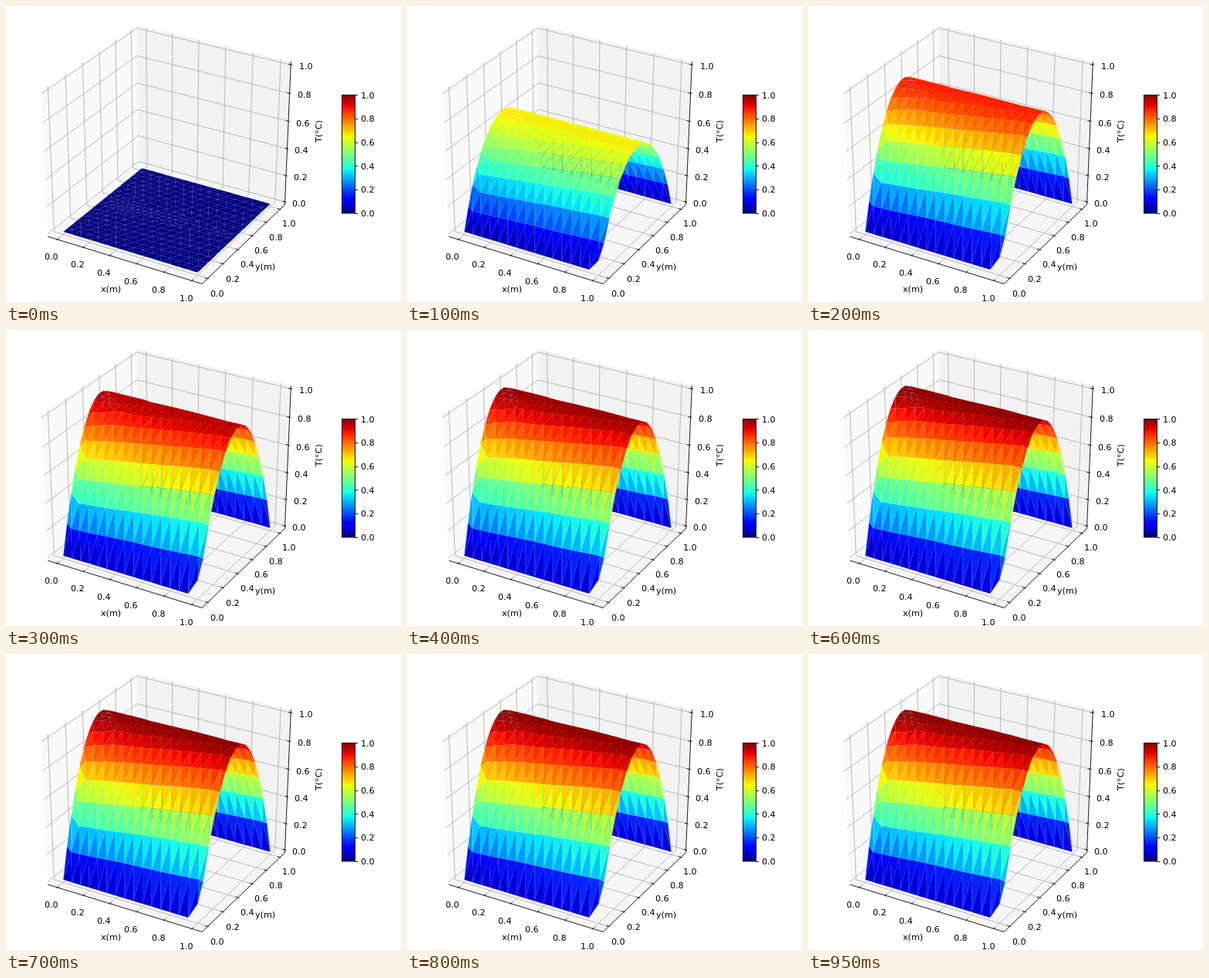
Write an HTML page with a canvas that moves like this. It is 512 by 384 pixels and loops after 1000 ms.

```html
<!DOCTYPE html>
<html>
<head>
<meta charset="utf-8">
<style>
  html, body { margin: 0; width: 100%; height: 100%; overflow: hidden; background: #fff; }
  canvas { display: block; }
</style>
</head>
<body>
<canvas id="stage" width="512" height="384"></canvas>
<script>
const ctx = document.getElementById('stage').getContext('2d');
const E = 0.5 + 1 / 48;            // half size of the axes box
const TICKS = [0, 0.2, 0.4, 0.6, 0.8, 1];
const GRID = '#b0b0b0';
const { abs, sin, exp, PI, hypot, round, floor } = Math;

// Perspective view from elevation 30, azimuth -60, distance 10
const depth = ([x, y, z]) => 0.433 * x - 0.75 * y + 0.5 * z;
function project(p) {
  const [x, y, z] = p, d = 10 - depth(p);
  const u = (0.866 * x + 0.5 * y) / d;
  const v = (-0.25 * x + 0.433 * y + 0.866 * z) / d;
  return [(u + 0.095) * 409.6 / 0.185, 384 - (v + 0.095) * 384 / 0.185];
}
const flat = v => (v - 0.5) / 1.1; // x or y value to box units

function path(points) {
  ctx.beginPath();
  for (const p of points) ctx.lineTo(...project(p));
}
function fill(points, color) {
  path(points);
  ctx.fillStyle = color;
  ctx.fill();
}
function line(points, color = '#000') {
  path(points);
  ctx.strokeStyle = color;
  ctx.stroke();
}

// Piecewise linear colour map
function ramp(v, stops) {
  for (let i = 1; i < stops.length; i++) {
    const [a, p] = stops[i - 1], [b, q] = stops[i];
    if (v <= b) return round(255 * (p + (q - p) * (v - a) / (b - a)));
  }
  return round(255 * stops[stops.length - 1][1]);
}
const RED = [[0, 0], [0.35, 0], [0.66, 1], [0.89, 1], [1, 0.5]];
const GREEN = [[0, 0], [0.125, 0], [0.375, 1], [0.64, 1], [0.91, 0], [1, 0]];
const BLUE = [[0, 0.5], [0.11, 1], [0.34, 1], [0.65, 0], [1, 0]];
const jet = v => `rgb(${ramp(v, RED)},${ramp(v, GREEN)},${ramp(v, BLUE)})`;

// Mesh nodes: staggered rows from both cold edges that close up to the left,
// a fine filling in the wedge between them, and the border
function makeNodes() {
  const nodes = [], N = 15, LEFT = 17, ROWS = 7;
  const step = x => 0.05 + 0.018 * x;
  const jitter = () => 0.001 * sin(97 * nodes.length);
  const add = (x, y) => {
    const dx = 0.19 - x, dy = 0.46 - y;
    const pull = 0.35 * exp(-(dx * dx + dy * dy) / 0.01);
    nodes.push([x + dx * pull + jitter(), y + dy * pull + jitter() / 2]);
  };
  for (let j = 1; j <= ROWS; j++)
    for (let i = j % 2 ? 0.5 : 1; i < N; i++) {
      const x = i / N, y = j * step(x);
      add(x, y);
      add(x, 1 - y);
    }
  for (let j = -3; j <= 3; j++)
    for (let x = j % 2 ? 0.035 : 0.058; x < 0.97; x += 0.045) {
      const y = 0.04 * j;
      if (abs(y) + 0.03 < 0.5 - ROWS * step(x)) add(x, 0.5 + y);
    }
  for (let i = 0; i <= N; i++) {
    const t = i / N + (i % N ? jitter() / 4 : 0);
    nodes.push([t, 0], [t, 1]);
    if (i % N) nodes.push([1, t]);
  }
  for (let i = 1; i < LEFT; i++) nodes.push([0, i / LEFT + jitter() / 4]);
  return nodes;
}

// Delaunay triangulation by incremental insertion
function triangulate(nodes) {
  const n = nodes.length;
  const p = [...nodes, [-90, -90], [90, -90], [0, 120]];
  const make = (a, b, c) => {
    const [ax, ay] = p[a];
    const bx = p[b][0] - ax, by = p[b][1] - ay, cx = p[c][0] - ax, cy = p[c][1] - ay;
    const det = 2 * (bx * cy - by * cx), bb = bx * bx + by * by, cc = cx * cx + cy * cy;
    const ux = (cy * bb - by * cc) / det, uy = (bx * cc - cx * bb) / det;
    return { ids: [a, b, c], x: ax + ux, y: ay + uy, r: hypot(ux, uy) };
  };
  let tris = [make(n, n + 1, n + 2)];
  for (let i = 0; i < n; i++) {
    const edges = new Map();
    tris = tris.filter(t => {
      if (hypot(p[i][0] - t.x, p[i][1] - t.y) >= t.r) return true;
      t.ids.forEach((a, k) => {
        const b = t.ids[(k + 1) % 3], key = a < b ? a + ',' + b : b + ',' + a;
        if (!edges.delete(key)) edges.set(key, [a, b]);
      });
      return false;
    });
    for (const [a, b] of edges.values()) tris.push(make(a, b, i));
  }
  return tris.map(t => t.ids).filter(ids => ids.every(k => k < n));
}

const nodes = makeNodes();
const tris = triangulate(nodes);

// Heated plate with cold edges at y = 0 and y = 1, after k implicit time steps
function profile(y, k) {
  let sum = 4 * y * (1 - y);
  for (const m of [1, 3, 5, 7])
    sum -= 32 / (PI * m) ** 3 * sin(m * PI * y) / (1 + 0.754 * m * m) ** k;
  return k ? Math.max(0, 0.995 * sum) : 0;
}
// The corner at x = 1, y = 0 is not held cold
const heat = ([x, y], k) =>
  x === 1 && y === 0 ? profile(1 / 15, k) / 2 : profile(y, k);

function label(text, x, y) {
  ctx.fillStyle = '#000';
  ctx.fillText(text, round(x - ctx.measureText(text).width / 2), y);
}
function tickLabel(value, p) {
  const [x, y] = project(p);
  label(value.toFixed(1), x, round(y + 8.4));
}

function drawAxes() {
  fill([[-E, -E, -E], [-E, E, -E], [-E, E, E], [-E, -E, E]], '#f9f9f9');
  fill([[-E, E, -E], [E, E, -E], [E, E, E], [-E, E, E]], '#f2f2f2');
  fill([[-E, -E, -E], [E, -E, -E], [E, E, -E], [-E, E, -E]], '#f5f5f5');
  ctx.lineWidth = 0.89;
  for (const t of TICKS) {
    const f = flat(t), z = t - 0.5;
    line([[f, -E, -E], [f, E, -E], [f, E, E]], GRID);
    line([[E, f, -E], [-E, f, -E], [-E, f, E]], GRID);
    line([[-E, -E, z], [-E, E, z], [E, E, z]], GRID);
  }
  line([[-E, -E, -E], [E, -E, -E], [E, E, -E], [E, E, E]]);
  const out = E + 0.1 / 12, inn = E - 0.2 / 12, far = E + 0.0644;
  for (const t of TICKS) {
    const f = flat(t), z = t - 0.5;
    line([[f, -out, -E], [f, -inn, -E]]);
    line([[out, f, -E], [inn, f, -E]]);
    line([[out, E, z], [inn, E, z]]);
    tickLabel(t, [f, -far, -far]);
    tickLabel(t, [far, f, -far]);
    tickLabel(t, [far, far, z]);
  }
  label('x(m)', 136, 371);
  label('y(m)', 336.5, 342);
  ctx.save();
  ctx.translate(409, 163);
  ctx.rotate(-PI / 2);
  label('T(°C)', 0, 0);
  ctx.restore();
}

function drawBar() {
  const x = 435.2, y = 115.2, w = 17.1, h = 153.6;
  const grad = ctx.createLinearGradient(0, y + h, 0, y);
  for (let i = 0; i <= 100; i++) grad.addColorStop(i / 100, jet(i / 100));
  ctx.fillStyle = grad;
  ctx.fillRect(x, y, w, h);
  ctx.strokeStyle = '#000';
  ctx.strokeRect(435.5, 115.5, 17, 153.5);
  for (const t of TICKS) {
    const ty = y + h * (1 - t), snap = round(ty) + 0.5;
    ctx.beginPath();
    ctx.moveTo(x + w, snap);
    ctx.lineTo(x + w + 3.9, snap);
    ctx.stroke();
    label(t.toFixed(1), 469, round(ty + 4.4));
  }
}

function drawSurface(k) {
  const temps = nodes.map(p => heat(p, k));
  const points = nodes.map(([x, y], i) => [flat(x), flat(y), temps[i] - 0.5]);
  tris.map(ids => ({
    corners: ids.map(i => points[i]),
    mean: ids.reduce((s, i) => s + temps[i], 0) / 3,
    near: ids.reduce((s, i) => s + depth(points[i]), 0)
  })).sort((a, b) => a.near - b.near)
    .forEach(t => fill(t.corners, jet(t.mean)));
}

function draw(k) {
  ctx.fillStyle = '#fff';
  ctx.fillRect(0, 0, 512, 384);
  ctx.font = "11.11px 'DejaVu Sans', sans-serif";
  drawAxes();
  drawBar();
  drawSurface(k);
}

let shown = -1;
function tick() {
  const k = floor(performance.now() % 1000 / 50);
  if (k !== shown) draw(shown = k);
  requestAnimationFrame(tick);
}
tick();
</script>
</body>
</html>
```
